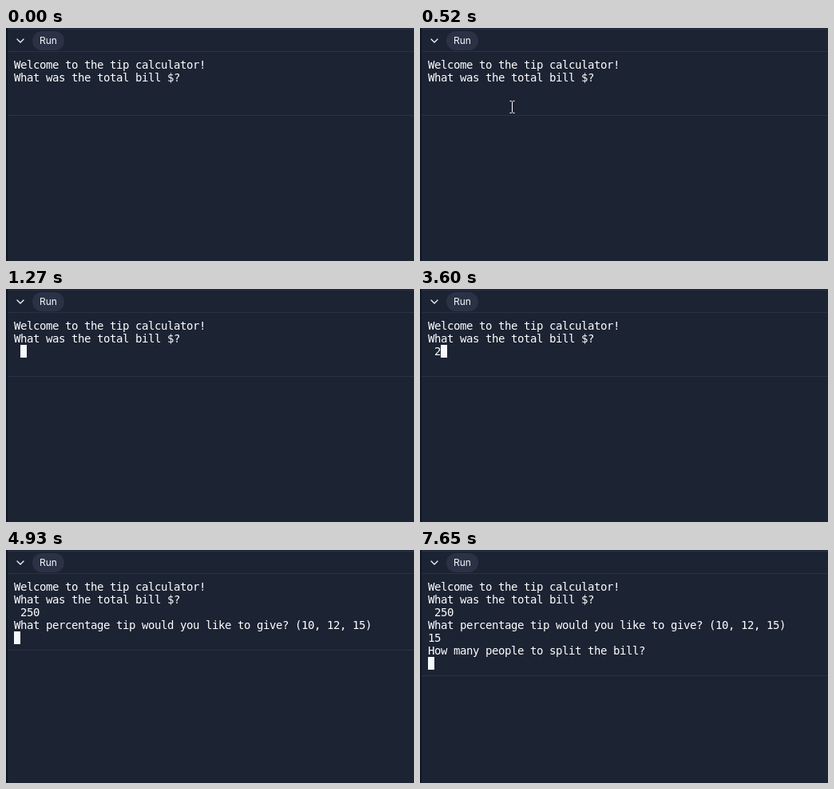
An HTML page for the animation above (8 s loop, 511 px wide and 292 px high).

```html
<!DOCTYPE html>
<html lang="en">
<head>
<meta charset="utf-8">
<title>Tip calculator console</title>
<style>
  html, body { margin: 0; width: 100%; height: 100%; overflow: hidden; background: #1c2333; }
  #stage { position: relative; width: 511px; height: 292px; overflow: hidden; background: #1c2333; }
  #stage > * { position: absolute; }
  .edge { left: 0; top: 0; width: 2px; height: 292px; background: #0e1525; }
  .line { left: 2px; right: 0; height: 1px; background: #2b3245; }
  .run {
    left: 33px; top: 4px; width: 40px; height: 24px; border-radius: 12px;
    background: #2b3245; color: #f5f9fc; text-align: center;
    font: 12px/24px Inter, sans-serif;
  }
  #console {
    left: 10px; top: 38px; margin: 0; color: #fff; white-space: pre;
    font: 14px/16px "DejaVu Sans Mono", monospace;
    letter-spacing: calc(8px - 1ch);
  }
  #block { width: 8px; height: 16px; background: #f5f9fc; }
  svg { left: 0; top: 0; fill: none; }
</style>
</head>
<body>
<div id="stage">
  <div class="line" style="top:1px"></div>
  <div class="line" style="top:29px"></div>
  <div class="line" id="rule"></div>
  <div class="edge"></div>
  <div class="run">Run</div>
  <pre id="console"></pre>
  <div id="block"></div>
  <svg width="511" height="292">
    <path d="M14 14l4 4 4-4" stroke="#f5f9fc" stroke-width="1.3" stroke-linecap="round" stroke-linejoin="round"/>
    <path id="pointer" d="M-3-7.5h2l1 1 1-1h2M0-6.5v13M-3 7.5h2l1-1 1 1h2" transform="translate(.5 .5)" stroke="#fff"/>
  </svg>
</div>
<script>
const LOOP = 8000;
const $ = id => document.getElementById(id);
const [consoleText, block, rule, pointer] = ['console', 'block', 'rule', 'pointer'].map($);

const bill = 'Welcome to the tip calculator!\nWhat was the total bill $?\n ';
const tip = bill + '250\nWhat percentage tip would you like to give? (10, 12, 15)\n';
const split = tip + '15\nHow many people to split the bill?\n';

// [start, text, divider y, focused]
const screens = [
  [0, bill, 109, false],
  [1070, bill, 109, true],
  [3600, bill + '2', 109, true],
  [3800, bill + '25', 109, true],
  [4000, bill + '250', 109, true],
  [4930, tip, 125, true],
  [7050, tip + '1', 141, true],
  [7260, tip + '15', 141, true],
  [7650, split, 157, true]
];

// [start, x, y]; no position hides the pointer
const moves = [
  [0], [190, 364, 265], [260, 276, 208], [330, 205, 160], [400, 158, 127],
  [460, 130, 108], [520, 115, 99], [590, 102, 93], [660, 93, 89], [730, 86, 87],
  [800, 81, 86], [860, 78, 86], [990, 77, 87],
  [1070, 82, 95], [1130, 98, 115], [1200, 136, 159], [1270]
];

const at = (steps, t) => steps.findLast(step => step[0] <= t);
let shown;

function draw() {
  const t = performance.now() % LOOP;
  const screen = at(screens, t);
  if (screen !== shown) {
    shown = screen;
    const [, text, divider, focused] = screen;
    const rows = text.split('\n');
    consoleText.textContent = text;
    rule.style.top = divider + 'px';
    block.style.left = 10 + 8 * rows.at(-1).length + 'px';
    block.style.top = 38 + 16 * (rows.length - 1) + 'px';
    block.style.visibility = focused ? 'visible' : 'hidden';
  }
  const [, x, y] = at(moves, t);
  pointer.style.visibility = x ? 'visible' : 'hidden';
  if (x) pointer.setAttribute('transform', `translate(${x + .5} ${y})`);
  requestAnimationFrame(draw);
}
draw();
</script>
</body>
</html>
```
